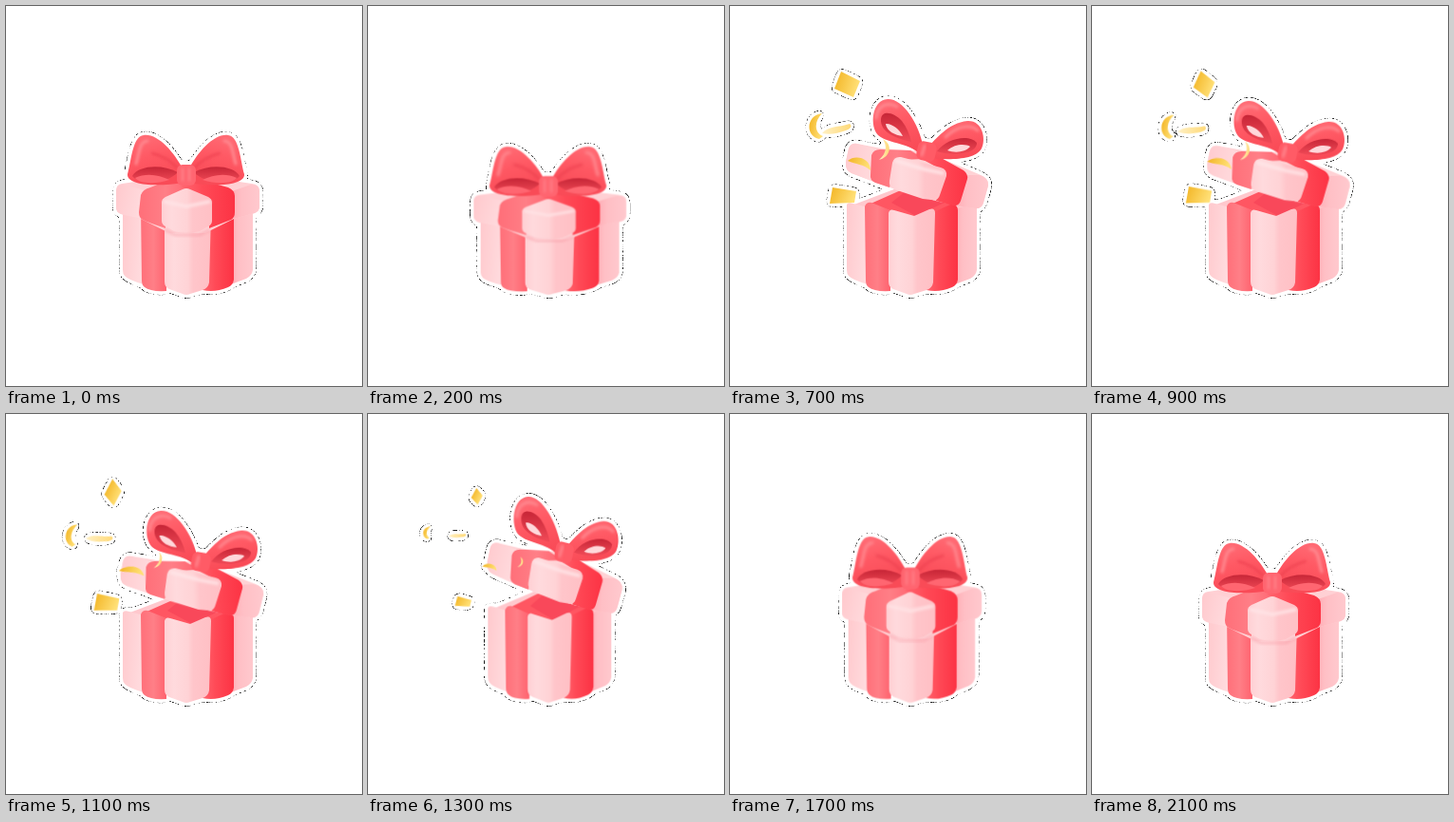
An HTML page for the animation above (2.2 s loop, 375x400 px).

```html
<!DOCTYPE html>
<html lang="en">
<head>
<meta charset="utf-8">
<title>Gift box</title>
<style>
  html, body { margin: 0; width: 100%; height: 100%; overflow: hidden; background: #fff; }
  svg { display: block; width: 375px; height: 400px; }
  #box { transform-origin: 190px 304px; }
  #bow { transform-origin: 190px 188px; }
  #open { transform-origin: 197px 178px; }
  .round { stroke-width: 3; stroke-linejoin: round; }
  .soft { fill: none; stroke-linecap: round; filter: url(#blur); }
</style>
</head>
<body>
<svg viewBox="0 0 375 400">
  <defs>
    <linearGradient id="pale" x2="1" y2=".3"><stop stop-color="#ffc9cd"/><stop offset="1" stop-color="#ffdadd"/></linearGradient>
    <linearGradient id="front"><stop stop-color="#ffd0d4"/><stop offset=".2" stop-color="#ffdadd"/><stop offset=".5" stop-color="#ffd3d6"/><stop offset=".62" stop-color="#ffc5ca"/><stop offset="1" stop-color="#ffc0c5"/></linearGradient>
    <linearGradient id="side"><stop stop-color="#ffaeb6"/><stop offset=".35" stop-color="#ffbfc5"/><stop offset="1" stop-color="#ffc9ce"/></linearGradient>
    <linearGradient id="coral"><stop stop-color="#ff6f79"/><stop offset=".5" stop-color="#ff7f87"/><stop offset="1" stop-color="#ff626e"/></linearGradient>
    <linearGradient id="red"><stop stop-color="#ff6670"/><stop offset=".4" stop-color="#ff4a57"/><stop offset="1" stop-color="#fc3344"/></linearGradient>
    <linearGradient id="loop" x2=".3" y2="1"><stop stop-color="#ff7079"/><stop offset=".5" stop-color="#ff5964"/><stop offset="1" stop-color="#f94b57"/></linearGradient>
    <linearGradient id="hole" x2="0" y2="1"><stop stop-color="#c72637"/><stop offset="1" stop-color="#f14a57"/></linearGradient>
    <linearGradient id="gold" x2="1" y2=".3"><stop stop-color="#f2b321"/><stop offset="1" stop-color="#ffdf75"/></linearGradient>
    <linearGradient id="light" x2="1"><stop stop-color="#fff0c4"/><stop offset="1" stop-color="#ffd977"/></linearGradient>
    <filter id="blur" x="-50%" y="-50%" width="200%" height="200%"><feGaussianBlur stdDeviation="1.4"/></filter>
    <!-- white sticker rim with a thin broken dark line -->
    <filter id="rim" filterUnits="userSpaceOnUse" x="0" y="0" width="375" height="400" color-interpolation-filters="sRGB">
      <feGaussianBlur in="SourceAlpha" stdDeviation="2.5" result="glow"/>
      <feComponentTransfer in="glow" result="outer"><feFuncA type="linear" slope="45" intercept="-1.5"/></feComponentTransfer>
      <feComponentTransfer in="glow" result="inner"><feFuncA type="linear" slope="40" intercept="-2.6"/></feComponentTransfer>
      <feTurbulence type="fractalNoise" baseFrequency=".45" numOctaves="1" seed="4"/>
      <feColorMatrix values="0 0 0 0 .12  0 0 0 0 .12  0 0 0 0 .12  9 0 0 0 -4.2" result="dots"/>
      <feComposite in="dots" in2="outer" operator="in" result="line"/>
      <feFlood flood-color="#fff"/>
      <feComposite in2="inner" operator="in" result="white"/>
      <feMerge><feMergeNode in="line"/><feMergeNode in="white"/><feMergeNode in="SourceGraphic"/></feMerge>
    </filter>
  </defs>

  <g filter="url(#rim)">
    <g id="box">
      <g id="body">
        <path d="M128 210L178 191L256 210L216 226L193 228L150 220Z" fill="#ffc8cd"/>
        <path d="M146 209L182 193L240 206L216 217L194 223L168 215Z" fill="#ff5662"/>
        <path d="M170 207L185 195L230 205L196 221Z" fill="#f9485a"/>
        <path d="M123 209Q124 206 130 208L145 212V293Q128 288 125 284Q123 282 123 278Z" fill="url(#pale)"/>
        <path d="M237 214L256 208Q260 208 260 213V278Q259 284 253 287L237 293Z" fill="url(#side)"/>
        <path d="M142 211Q144 206 149 207L169 215V300Q152 301 146 296Q143 294 143 289Z" fill="url(#coral)"/>
        <path d="M212 218L232 209Q240 208 240 215V288Q239 294 234 296Q220 302 207 299Z" fill="url(#red)"/>
        <path d="M167 218Q168 213 173 215L194 221L210 214Q216 212 216 218L214 291Q213 297 207 299L194 303Q190 305 186 303L172 298Q167 296 167 290Z" fill="url(#front)"/>
        <path class="soft" d="M192 232V297" stroke="#ffe3e5" stroke-width="3"/>
      </g>

      <g id="closed">
        <path d="M116 194Q116 188 122 187L150 183H232L259 187Q267 188 267 194V211Q267 216 262 218L240 224L210 239H172L142 224L121 219Q116 217 116 212Z" fill="#ffd0d4"/>
        <path d="M116 194Q117 188 124 188L146 194L143 224L121 219Q116 217 116 212Z" fill="url(#pale)"/>
        <path d="M238 195L258 188Q267 188 267 195V211Q267 216 262 218L240 224Z" fill="url(#side)"/>
        <path d="M142 199Q144 193 152 191L172 183L196 187L192 196L168 204V234Q150 228 144 225Q140 223 140 217Z" fill="url(#coral)"/>
        <path d="M184 190L205 183L234 191Q241 194 241 200V217Q241 223 237 225L214 234V204Z" fill="url(#red)"/>
        <path d="M164 207Q164 203 168 201L186 193Q190 191 194 193L213 201Q217 203 217 207V226Q217 230 213 232L204 237Q190 241 177 237L168 232Q164 230 164 226Z" fill="url(#front)"/>
        <path class="soft" d="M167 206L190 211L214 206" stroke="#ffe4e6" stroke-width="3"/>
        <path class="soft" d="M168 236L178 241H204L214 236" stroke="#f58d99" stroke-width="2" opacity=".5"/>
        <g id="bow">
          <g id="wing">
            <path d="M186 171C177 154 160 134 145 136C133 137 132 164 128 177C127 190 164 190 186 186Z" fill="url(#loop)"/>
            <path d="M133 179C139 168 164 166 181 175C170 187 142 190 133 179Z" fill="url(#hole)"/>
            <path d="M136 181C148 175 162 178 172 183C156 188 141 187 136 181Z" fill="#ff6671"/>
            <path class="soft" d="M137 166C141 153 140 143 149 142" stroke="#ff8a91" stroke-width="3"/>
            <path class="soft" d="M154 155Q170 159 180 170" stroke="#ee4150" stroke-width="2"/>
          </g>
          <use href="#wing" transform="matrix(-1 0 0 1 379 0)"/>
          <rect x="180" y="167" width="20" height="22" rx="6" fill="#ff6570"/>
          <path class="soft" d="M186 171V184M193 171V184" stroke="#ff858d" stroke-width="2"/>
        </g>
      </g>

      <g id="open">
        <path d="M122 164L125 150Q127 144 134 145L160 150L205 153L262 177Q273 181 272 189L267 207Q265 214 258 213L220 206L165 190L128 176Q121 173 122 164Z" fill="#ffd2d5"/>
        <path d="M122 164L125 150Q127 144 134 145L154 151L149 184L128 176Q121 173 122 164Z" fill="url(#pale)"/>
        <path d="M247 178L263 178Q273 181 272 189L267 207Q265 214 258 213L238 210Z" fill="url(#side)"/>
        <path d="M149 157Q151 151 158 151L190 152L205 161L176 162L168 191L153 186Q147 183 148 178Z" fill="url(#coral)"/>
        <path d="M200 160L217 157L246 173Q251 177 250 182L243 205Q241 211 235 210L217 205L226 174Z" fill="url(#red)"/>
        <path d="M171 165Q173 158 180 159L222 170Q229 172 228 179L221 199Q219 206 212 204L203 203L173 193Q167 190 168 184Z" fill="url(#front)"/>
        <path class="soft" d="M175 163L205 172L224 176" stroke="#ffe6e8" stroke-width="3"/>
        <path d="M204 150C199 122 181 97 166 98C149 99 147 127 156 136C168 146 190 143 203 159Z" fill="url(#loop)"/>
        <path d="M159 119C160 109 173 112 181 121Q188 130 191 143C177 140 158 134 159 119Z" fill="url(#hole)"/>
        <path d="M164 124C170 123 179 130 182 137C174 136 165 132 164 124Z" fill="#ffd8db"/>
        <path class="soft" d="M154 118C155 103 168 101 176 106" stroke="#ff8990" stroke-width="3"/>
        <path d="M208 149C217 140 230 123 250 121C266 120 270 140 265 150C258 163 228 162 209 160Z" fill="url(#loop)"/>
        <path d="M218 153C229 138 253 135 260 144C260 156 235 159 218 153Z" fill="url(#hole)"/>
        <path d="M229 152C237 145 248 145 253 148C248 154 237 155 229 152Z" fill="#ffd8db"/>
        <path class="soft" d="M227 138C239 126 254 124 261 131" stroke="#ff8990" stroke-width="3"/>
        <rect x="197" y="143" width="20" height="20" rx="6" fill="#ff5b66" transform="rotate(12 207 153)"/>
        <path class="soft" d="M205 147L202 157" stroke="#ff858d" stroke-width="3"/>
      </g>
    </g>

    <path id="flake" d="M-7-14L13-4L6 13L-14 4Z" fill="url(#gold)"/>
    <path id="curl" d="M6-14C-11-12-12 10 3 13L7 10C-3 6-2-6 6-14Z" fill="url(#gold)"/>
    <path id="strip" d="M-15 4C-9-4 2-2 14-6C18-3 13 0 10 1C1 4-6 6-15 4Z" fill="url(#light)"/>
    <path id="card" d="M-12-9L13-5L11 7L-15 8Z" fill="url(#gold)"/>
    <path id="moon" d="M-12-4C-4-11 12-7 12 6C4-1-3 0-12-4Z" fill="url(#gold)"/>
    <path id="arc" d="M-2-11C9-5 6 8-6 11C3 3 2-4-2-11Z" fill="url(#light)"/>
  </g>
</svg>
<script>
const LOOP = 2200, STEP = 100;
const sheet = document.head.appendChild(document.createElement('style'));

// Keys are in ms; each stretch between two keys moves in 100 ms steps.
function track(id, prop, keys) {
  const times = Object.keys(keys).map(Number);
  const frames = times.map((t, i) => {
    const n = Math.max(1, Math.round(((times[i + 1] ?? LOOP) - t) / STEP));
    return `${t / LOOP * 100}%{${prop}:${keys[t]};animation-timing-function:steps(${n})}`;
  });
  if (times.at(-1) < LOOP) frames.push(`100%{${prop}:${keys[times[0]]}}`);
  sheet.textContent += `@keyframes ${id}-${prop}{${frames.join('')}}
    #${id}{animation:${id}-${prop} ${LOOP}ms -2ms infinite}`;
}

const pose = (x, y, turn = 0, sx = 1, sy = sx) =>
  `translate(${x}px,${y}px) rotate(${turn}deg) scale(${sx},${sy})`;
const scale = (sx, sy) => `scale(${sx},${sy})`;

track('box', 'transform', {
  0: scale(1, 1), 200: scale(1.065, .9), 300: scale(1.02, .97), 400: scale(.95, 1.05),
  500: scale(.98, 1.02), 700: scale(1, 1), 1100: scale(1, 1), 1300: scale(.95, 1.05),
  1400: scale(.98, 1.02), 1500: scale(1.03, .96), 1700: scale(.975, 1.04), 1900: scale(1, 1)
});
track('bow', 'transform', {
  0: scale(1, 1), 200: scale(.94, 1.1), 300: scale(.98, 1.03), 400: scale(1, 1), 1400: scale(1, 1),
  1500: scale(.97, 1.03), 1700: scale(1.01, 1), 1900: scale(1, 1)
});
track('closed', 'opacity', { 0: 1, 300: 1, 400: 0, 1400: 0, 1500: 1 });

// The raised lid needs both a pose and a hard on/off, so both share one value.
const lid = (shown, ...p) => `${pose(...p)};opacity:${shown}`;
track('open', 'transform', {
  0: lid(0, -5, 22, -14), 300: lid(0, -5, 22, -14), 400: lid(1, -3, 12, -8), 500: lid(1, 1, -4, 1),
  700: lid(1, 0, 0), 1100: lid(1, -1, 3, -1.5), 1300: lid(1, 0, 0, 1),
  1400: lid(1, -4, 16, -9), 1500: lid(0, -5, 22, -14)
});

// Each piece: burst, drift, shrink.
function confetti(id, far, drift, last) {
  const start = [180, 185];
  const toward = (k, turn) => pose(
    start[0] + (far[0] - start[0]) * k, start[1] + (far[1] - start[1]) * k, turn, .4 + .6 * k);
  const gone = pose(...start, -60, 0);
  track(id, 'transform', {
    0: gone, 300: gone, 400: toward(.4, -40), 500: toward(.72, -20), 600: toward(.92, -6),
    700: pose(...far), 1100: pose(...drift), 1300: pose(...last),
    1500: pose(last[0] - 3, last[1] + 2, last[2], 0), 2200: gone
  });
}
confetti('flake', [124, 83], [113, 83, 14, .62, 1], [115, 87, 14, .42, .62]);
confetti('curl', [91, 127], [69, 128, 8, .8, .88], [62, 125, 8, .5]);
confetti('strip', [112, 130], [98, 131, 14, .9], [94, 128, 10, .58]);
confetti('card', [120, 200], [107, 199, 2, .94, 1.05], [101, 198, 6, .6]);
confetti('moon', [136, 167], [132, 167, -8, 1.06, .9], [128, 162, -6, .6]);
confetti('arc', [163, 151], [161, 154, 10, .65, .8], [161, 156, 5, .5]);
</script>
</body>
</html>
```
